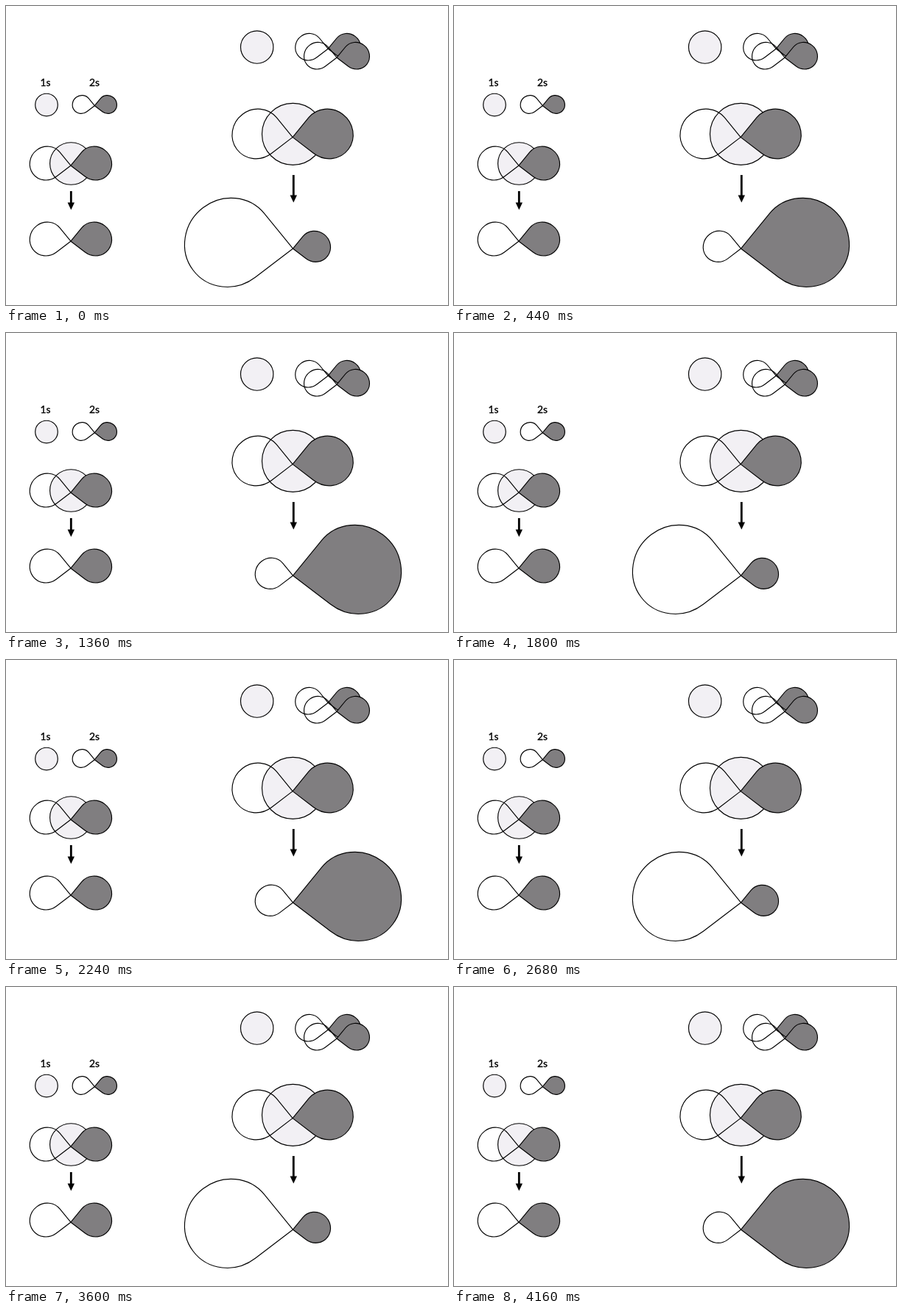
An HTML page with a canvas that plays this animation: 600x407 px, repeating every 4.6 s.

```html
<!DOCTYPE html>
<html lang="en">
<head>
<meta charset="utf-8">
<title>Orbital mixing</title>
<style>
  html, body { margin: 0; width: 100%; height: 100%; overflow: hidden; background: #fff; }
  canvas { display: block; }
</style>
</head>
<body>
<canvas id="stage" width="600" height="407"></canvas>
<script>
const ctx = document.getElementById('stage').getContext('2d');
const PALE = '#f2f0f4', GREY = '#807e80', INK = '#000';
const LOOP = 4600;
const FLIPS = [440, 920, 1360, 1800, 2240, 2680, 3160, 3600, 4160];

// Lobe proportions for radius 1: offset from centre to tip, and a slight diagonal stretch.
const TIP_X = 1.43, TIP_Y = 0.137, SKEW = 0.0225;

function paint(fill) {
  if (fill) {
    ctx.fillStyle = fill;
    ctx.fill();
  }
  ctx.stroke();
}

function sphere(x, y, r) {
  ctx.beginPath();
  ctx.arc(x, y, r, 0, Math.PI * 2);
  paint(PALE);
}

// A round bulb joined to its tip at x, y by two tangent lines; side is -1 (left) or 1 (right).
function lobe(x, y, r, side, fill) {
  const tx = TIP_X + SKEW * TIP_Y, ty = TIP_Y + SKEW * TIP_X;
  const aim = Math.atan2(ty, tx);
  const open = Math.acos(1 / Math.hypot(tx, ty));
  ctx.save();
  ctx.translate(x + side * TIP_X * r, y - TIP_Y * r);
  ctx.scale(-side * r, r);
  ctx.transform(1, -SKEW, -SKEW, 1, 0, 0);
  ctx.beginPath();
  ctx.moveTo(tx, ty);
  ctx.arc(0, 0, 1, aim + open, aim - open + Math.PI * 2);
  ctx.closePath();
  ctx.restore();
  paint(fill);
}

function orbital(x, y, left, right = left) {
  lobe(x, y, left, -1);
  lobe(x, y, right, 1, GREY);
}

function arrow(x, top, tip) {
  ctx.fillStyle = INK;
  ctx.fillRect(x - 1.4, top, 2.8, tip - top - 9);
  ctx.beginPath();
  ctx.moveTo(x - 4.7, tip - 10);
  ctx.lineTo(x + 4.7, tip - 10);
  ctx.lineTo(x, tip);
  ctx.fill();
}

function label(text, x, y) {
  ctx.fillStyle = INK;
  ctx.font = '13.8px Lato, Carlito, sans-serif';
  ctx.textAlign = 'center';
  ctx.lineWidth = 0.35;
  ctx.fillText(text, x, y);
  ctx.strokeText(text, x, y);
}

function draw(now) {
  const t = now % LOOP;
  const flipped = FLIPS.filter(f => f <= t).length % 2 === 1;

  ctx.fillStyle = '#fff';
  ctx.fillRect(0, 0, 600, 407);
  ctx.strokeStyle = INK;
  ctx.lineJoin = 'round';

  label('1s', 53.5, 109);
  label('2s', 120, 109);

  ctx.lineWidth = 1.15;
  sphere(55, 134.5, 15.3);
  orbital(120.3, 135.7, 12.4);
  sphere(88.3, 214.5, 28.7);
  orbital(87.9, 217.2, 22.9);
  arrow(88.3, 252, 277.5);
  orbital(87.9, 320.2, 22.9);

  sphere(340.7, 56, 22.2);
  orbital(437.2, 58.2, 18.3);
  orbital(449, 70.2, 18.3);
  sphere(389.5, 174.3, 42);
  orbital(389.1, 178.6, 33.8);
  arrow(390.3, 230, 267.5);
  if (flipped) orbital(389.5, 330.2, 21.1, 60.5);
  else orbital(389.5, 330.2, 60.5, 21);

  requestAnimationFrame(() => draw(performance.now() - start));
}

const start = performance.now();
draw(0);
</script>
</body>
</html>
```
